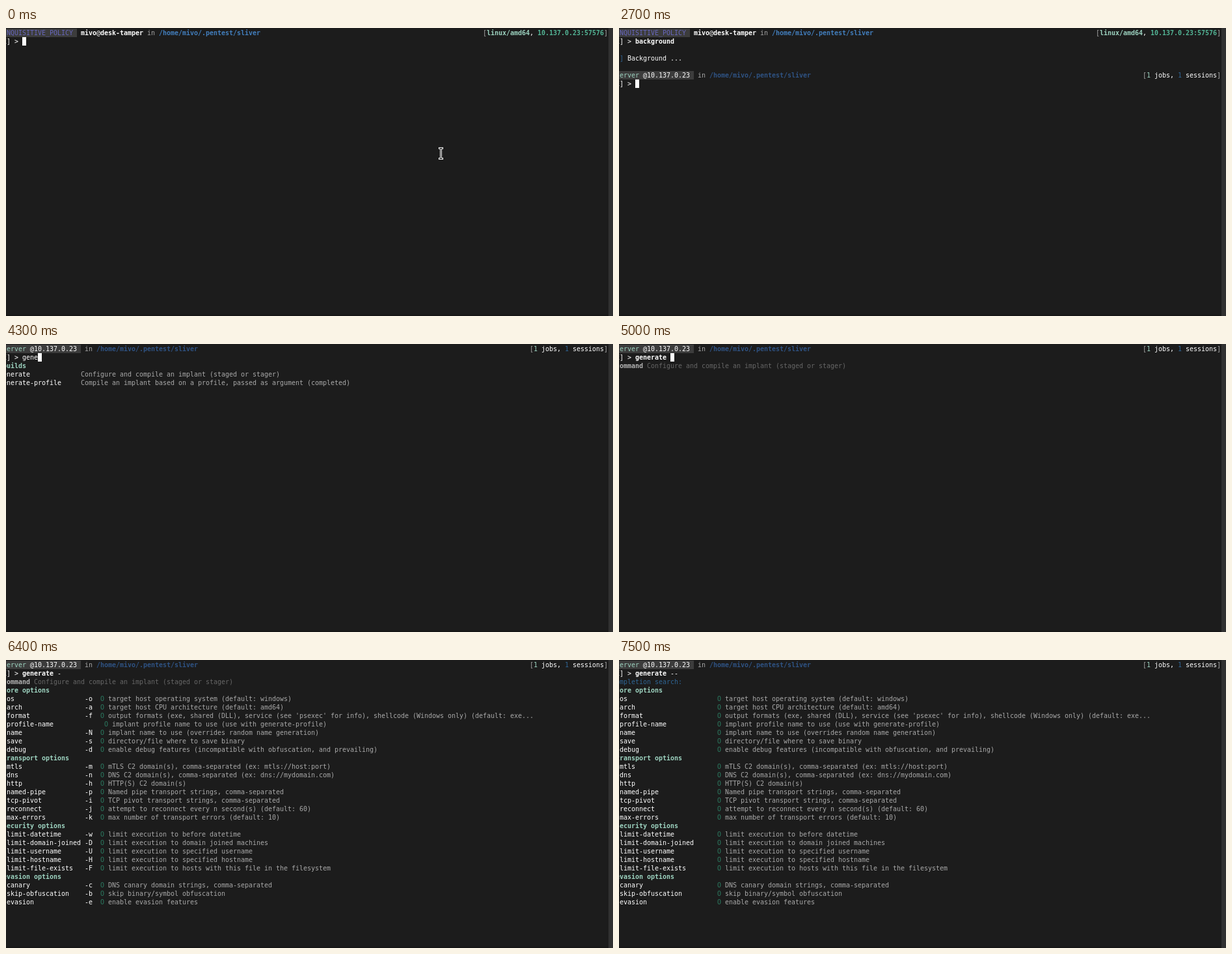
Write an HTML page that moves like this. It is 933 px wide and 442 px high and loops after 8 s.

```html
<!DOCTYPE html>
<html lang="en">
<head>
<meta charset="utf-8">
<title>Terminal session</title>
<style>
html, body { margin: 0; width: 100%; height: 100%; overflow: hidden; background: #1c1c1c; }
#stage { position: relative; width: 933px; height: 442px; overflow: hidden; background: #1c1c1c;
  font: 10px/13px "DejaVu Sans Mono", monospace; font-variant-ligatures: none; font-kerning: none; }
#stage span { position: absolute; height: 13px; white-space: pre; }
#bar { position: absolute; left: 926px; top: 0; width: 7px; height: 442px; background: #303030; }
#foot { position: absolute; left: 0; top: 440px; width: 926px; height: 2px; background: #161616; }
#caret { position: absolute; width: 6px; height: 13px; background: #fff; }
#mouse { position: absolute; left: 665px; top: 183px; }
</style>
</head>
<body>
<div id="stage">
  <div id="screen"></div>
  <div id="caret"></div>
  <svg id="mouse" width="7" height="19" shape-rendering="crispEdges">
    <path fill="#fff" d="M0 0h7v3h-2v13h2v3h-7v-3h2v-13h-2z"/>
    <path fill="#111" d="M1 1h5v1h-2v15h2v1h-5v-1h2v-15h-2z"/>
  </svg>
  <div id="bar"></div>
  <div id="foot"></div>
</div>
<script>
const CELL = 6, LINE = 13, LOOP = 8000;
const $ = id => document.getElementById(id);
const screen = $('screen'), caret = $('caret'), mouse = $('mouse');
const C = {
  white: '#ffffff', text: '#a9a9a9', dim: '#666666', hint: '#b4b4b4', mint: '#9dd3c0',
  green: '#52b394', ring: '#2b7a60', path: '#427ebd', navy: '#2f5384', blue: '#2f6594',
  name: '#6767bd', tag: '#3c3c3c'
};

// Keep the character grid at whole pixels.
const probe = document.createElement('span');
probe.textContent = 'x'.repeat(100);
screen.append(probe);
const spacing = CELL - probe.getBoundingClientRect().width / 100;
$('stage').style.letterSpacing = spacing.toFixed(4) + 'px';

function put(row, col, text, color = C.white, bold = false, bg = '') {
  const s = document.createElement('span');
  s.textContent = text;
  s.style.left = 1 + col * CELL + 'px';
  s.style.top = 1 + row * LINE + 'px';
  s.style.color = color;
  if (bold) s.style.fontWeight = 700;
  if (bg) {
    s.style.background = bg;
    s.style.width = text.length * CELL + 'px';
  }
  screen.append(s);
}

const DIR = '/home/mivo/.pentest/sliver';
const ABOUT = 'Configure and compile an implant (staged or stager)';

function sessionBar() {
  put(0, -1, 'INQUISITIVE_POLICY ', C.name, false, C.tag);
  put(0, 19, 'mivo', C.white, true);
  put(0, 23, '@');
  put(0, 24, 'desk-tamper', C.white, true);
  put(0, 36, 'in', C.text);
  put(0, 39, DIR, C.path, true);
  put(0, 122, '[', C.text);
  put(0, 123, 'linux/amd64', C.mint, true);
  put(0, 134, ',', C.white);
  put(0, 136, '10.137.0.23:57576', C.green, true);
  put(0, 153, ']', C.text);
}

function serverBar(row) {
  put(row, -1, 'server ', C.mint, false, C.tag);
  put(row, 6, '@10.137.0.23 ', C.white, false, C.tag);
  put(row, 20, 'in', C.text);
  put(row, 23, DIR, C.navy, true);
  put(row, 134, '[', C.text);
  put(row, 135, '1', C.mint);
  put(row, 137, 'jobs,');
  put(row, 143, '1', C.blue);
  put(row, 145, 'sessions');
  put(row, 153, ']', C.text);
}

// A recognised command is set in bold, its arguments are not.
function prompt(row, line) {
  put(row, -2, '[E] >');
  const known = (line.match(/^(background|generate)(?= |$)/) || [''])[0];
  if (known) put(row, 4, known, C.white, true);
  const rest = line.slice(known.length);
  if (rest.trim()) put(row, 4 + known.length, rest);
}

function usage(text) {
  put(2, -1, 'command', C.hint, true);
  put(2, 7, text, C.dim);
}

function commandMenu() {
  put(2, -1, 'builds', C.mint, true);
  put(3, -2, 'generate');
  put(3, 19, ABOUT, C.text);
  put(4, -2, 'generate-profile');
  put(4, 19, 'Compile an implant based on a profile, passed as argument (completed)', C.text);
}

function stagerMenu() {
  put(3, -1, 'generate', C.mint, true);
  put(4, -2, 'stager');
  put(4, 9, 'Generate a stager shellcode payload using MSFVenom, (to file: --save, to stdout: --format', C.text);
}

// "# title" opens a group, other lines are name|short flag|description.
const OPTIONS = `# core options
os|o|target host operating system (default: windows)
arch|a|target host CPU architecture (default: amd64)
format|f|output formats (exe, shared (DLL), service (see 'psexec' for info), shellcode (Windows only) (default: exe...
profile-name||implant profile name to use (use with generate-profile)
name|N|implant name to use (overrides random name generation)
save|s|directory/file where to save binary
debug|d|enable debug features (incompatible with obfuscation, and prevailing)
# transport options
mtls|m|mTLS C2 domain(s), comma-separated (ex: mtls://host:port)
dns|n|DNS C2 domain(s), comma-separated (ex: dns://mydomain.com)
http|h|HTTP(S) C2 domain(s)
named-pipe|p|Named pipe transport strings, comma-separated
tcp-pivot|i|TCP pivot transport strings, comma-separated
reconnect|j|attempt to reconnect every n second(s) (default: 60)
max-errors|k|max number of transport errors (default: 10)
# security options
limit-datetime|w|limit execution to before datetime
limit-domain-joined|D|limit execution to domain joined machines
limit-username|U|limit execution to specified username
limit-hostname|H|limit execution to specified hostname
limit-file-exists|F|limit execution to hosts with this file in the filesystem
# evasion options
canary|c|DNS canary domain strings, comma-separated
skip-obfuscation|b|skip binary/symbol obfuscation
evasion|e|enable evasion features`.split('\n');

function optionMenu(short) {
  OPTIONS.forEach((line, i) => {
    const row = i + 3;
    if (line[0] === '#') return put(row, -1, line.slice(2), C.mint, true);
    const [name, flag, about] = line.split('|');
    const withFlag = short && flag;
    const col = withFlag ? 24 : 25;
    put(row, -2, '--' + name);
    if (withFlag) put(row, 20, '-' + flag);
    put(row, col, 'O', C.ring);
    put(row, col + 2, about, C.text);
  });
}

const session = line => () => { sessionBar(); prompt(1, line); };
const server = (line, ...parts) => () => {
  serverBar(0);
  prompt(1, line);
  parts.forEach(p => p());
};
const about = () => usage(ABOUT);
const search = () => put(2, -2, 'completion search:', C.blue);
const shortMenu = () => optionMenu(true);
const longMenu = () => optionMenu(false);

const idle = session('');
const back = () => { session('background ')(); usage('Background the current session'); };
const left = () => {
  session('background')();
  put(3, -2, '[*]', C.blue);
  put(3, 2, 'Background ...');
  serverBar(5);
  prompt(6, '');
};
const stager = server('generate ', about, stagerMenu);
const flags = server('generate -', about, shortMenu);
const found = server('generate --', search, longMenu);

// [start, picture, caret column or -1, caret row]
const STEPS = [
  [0, idle, 4], [600, idle, -1], [1200, idle, 4],
  [1700, session('b'), 5], [1800, session('ba'), 6], [1900, session('bac'), 7],
  [2100, session('back'), 8], [2200, back, 15],
  [2700, left, 4, 6], [3300, left, -1], [3400, server(''), -1], [3500, server(''), 4],
  [3800, server('g'), 5], [3900, server('ge'), 6], [4000, server('gen'), 7], [4100, server('gene'), 8],
  [4300, server('gene', commandMenu), 8],
  [5000, server('generate ', about), 13], [5100, stager, 13], [5700, stager, -1],
  [5800, flags, 14], [6400, flags, -1],
  [6600, server('generate --', about, longMenu), 15],
  [6900, found, 15], [7500, found, -1]
];

let shown = -1;
function show(i) {
  if (i === shown) return;
  shown = i;
  const [start, draw, col, row = 1] = STEPS[i];
  screen.replaceChildren();
  draw();
  caret.style.display = col < 0 ? 'none' : 'block';
  caret.style.left = 1 + col * CELL + 'px';
  caret.style.top = 1 + row * LINE + 'px';
  mouse.style.display = start < 1700 ? 'block' : 'none';
}

const origin = performance.now();
function tick() {
  const t = (performance.now() - origin) % LOOP;
  show(STEPS.findLastIndex(s => s[0] <= t));
  requestAnimationFrame(tick);
}
tick();
</script>
</body>
</html>
```
